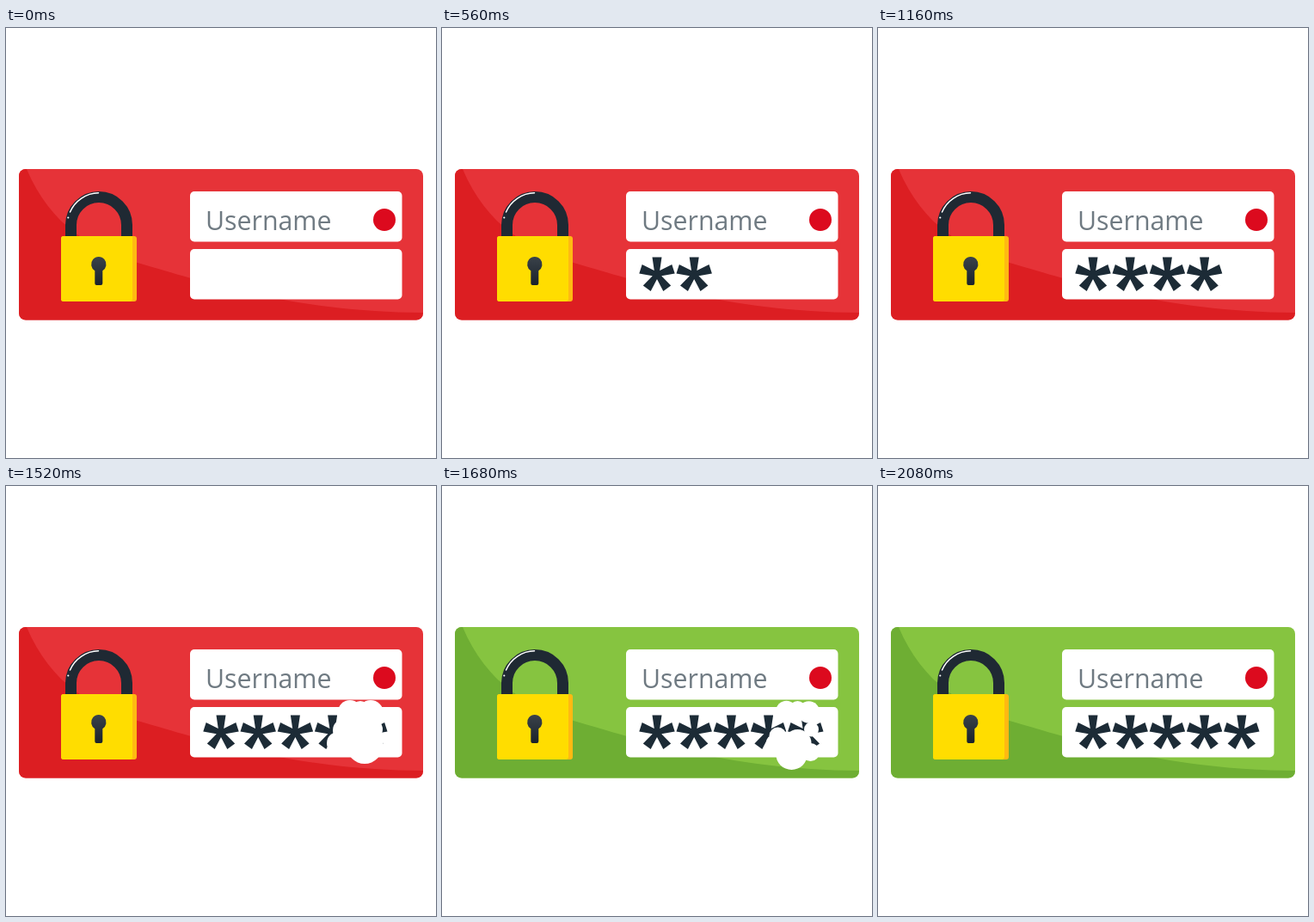
An HTML page that plays this animation: 500 px wide and 500 px high, repeating every 2.56 s.

```html
<!DOCTYPE html>
<html lang="en">
<head>
<meta charset="utf-8">
<title>Login unlock</title>
<style>
  html, body { margin: 0; width: 100%; height: 100%; overflow: hidden; background: #fff; }
  svg { display: block; width: 100vw; height: 100vh; }
  text { font: 30.3px "Open Sans", "Noto Sans", sans-serif; fill: #6f7a82; }
</style>
</head>
<body>
<svg viewBox="0 0 500 500">
  <defs>
    <clipPath id="cardClip"><rect x="15" y="164" width="470" height="175.5" rx="8"/></clipPath>
    <linearGradient id="holeFill" x1="0" y1="0" x2="0" y2="1">
      <stop offset="0" stop-color="#3a424a"/>
      <stop offset="1" stop-color="#1a222b"/>
    </linearGradient>
  </defs>

  <g clip-path="url(#cardClip)">
    <rect id="card" x="15" y="164" width="470" height="176"/>
    <path id="shade" d="M24 164C52 230 100 258 160 275S330 330 485 331V340H15V164Z"/>
  </g>

  <g id="lock">
    <path d="M75.5 244V229a32.5 32.5 0 0 1 65 0V244" fill="none" stroke="#1f2933" stroke-width="13"/>
    <path d="M74.5 214A36.5 36.5 0 0 1 107.5 191.8" fill="none" stroke="#fff" stroke-width="1.5" stroke-linecap="round"/>
    <circle cx="72.3" cy="220.5" r="1.1" fill="#fff"/>
    <rect x="64" y="242" width="88" height="76" rx="3" fill="#ffb912"/>
    <path d="M67 242H147V315a3 3 0 0 1-3 3H67a3 3 0 0 1-3-3V245a3 3 0 0 1 3-3Z" fill="#ffdd00"/>
    <path d="M103.3 282.2A8.7 8.7 0 1 1 112.3 282.2V297a2 2 0 0 1-2 2H105.3a2 2 0 0 1-2-2Z" fill="url(#holeFill)"/>
  </g>

  <rect x="214" y="190" width="246.5" height="58.5" rx="5" fill="#fff"/>
  <rect x="214" y="257" width="246.5" height="58.5" rx="5" fill="#fff"/>
  <text x="232" y="235">Username</text>
  <circle cx="440" cy="223" r="13" fill="#dc0a1e"/>

  <g id="stars" fill="#1c2b36"></g>
  <g id="puff" fill="#fff"></g>
</svg>
<script>
const LOOP = 2560, STEP = 40;
const PUFF_START = 1480, TURN_GREEN = 1560, SPREAD = 1800;
const typedAt = [280, 560, 840, 1160, 1440];
const themes = { locked: ["#e63338", "#dc1e22"], open: ["#86c440", "#6eae33"] };

// full cloud x, y, r; scattered x, y, r; time of vanishing
const blobs = [
  [400, 263, 14, 401, 261, 10.5, 2000],
  [424, 264, 15, 429, 262, 10.5, 2000],
  [412, 260, 10, 415, 259, 9, 2000],
  [386, 299, 13, 388, 300, 8, 2080],
  [417, 302, 21, 396, 321.5, 15.5, 2080],
  [426, 283, 12, 433, 283, 5, 2080],
  [408, 285, 24, 419, 313, 8, 2000],
  [426, 302, 13, 431, 317, 8, 2080],
  [393, 284, 13, 388, 297, 7, 2000]
];

const $ = id => document.getElementById(id);
const lerp = (a, b, p) => a + (b - a) * p;
const clamp = v => Math.min(1, Math.max(0, v));

function add(parent, name, attrs = {}) {
  const el = document.createElementNS("http://www.w3.org/2000/svg", name);
  for (const key in attrs) el.setAttribute(key, attrs[key]);
  return parent.appendChild(el);
}

function starPath(cx, cy) {
  const points = [];
  for (let i = 0; i < 5; i++) {
    const a = i * Math.PI * 0.4;
    const at = (along, across) => points.push([
      cx + along * Math.sin(a) + across * Math.cos(a),
      cy - along * Math.cos(a) + across * Math.sin(a)
    ].map(v => v.toFixed(2)));
    at(20, -5.5);
    at(20, 5.5);
    at(5.5 * Math.cos(Math.PI / 5), 5.5 * Math.sin(Math.PI / 5));
  }
  return "M" + points.join("L") + "Z";
}

const stars = typedAt.map((_, i) => add($("stars"), "path", { d: starPath(250 + 43.2 * i, 286.5) }));
const circles = blobs.map(() => add($("puff"), "circle"));

function drawPuff(t) {
  const grow = t < PUFF_START ? 0 : clamp(0.7 + 0.3 * (t - PUFF_START) / STEP);
  const spread = clamp((t - TURN_GREEN) / (SPREAD - TURN_GREEN));
  blobs.forEach(([x0, y0, r0, x1, y1, r1, end], i) => {
    const fade = clamp((t - SPREAD) / (end - SPREAD));
    const move = spread + 0.3 * fade;
    circles[i].setAttribute("cx", lerp(x0, x1, move));
    circles[i].setAttribute("cy", lerp(y0, y1, move));
    circles[i].setAttribute("r", lerp(r0, r1, spread) * grow * (1 - fade));
  });
}

function draw(now) {
  const t = Math.floor((now % LOOP) / STEP) * STEP;
  const [light, dark] = t < TURN_GREEN ? themes.locked : themes.open;
  $("card").setAttribute("fill", light);
  $("shade").setAttribute("fill", dark);
  stars.forEach((star, i) => star.setAttribute("visibility", t >= typedAt[i] ? "visible" : "hidden"));
  drawPuff(t);
}

const start = performance.now();
function tick() {
  draw(performance.now() - start);
  requestAnimationFrame(tick);
}
tick();
</script>
</body>
</html>
```
